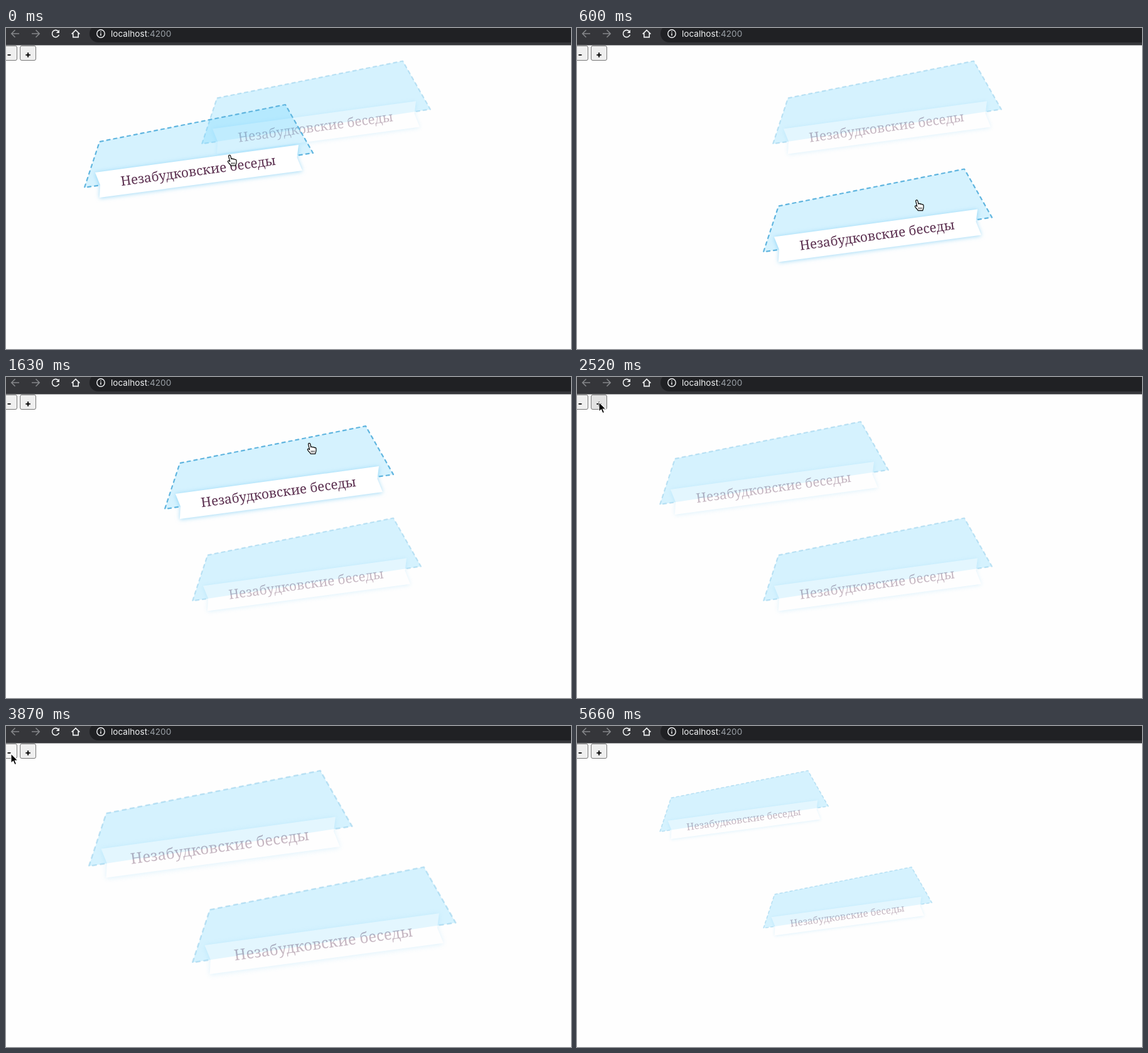
An HTML page for the animation above (6850 ms loop, 900x511 px).

```html
<!DOCTYPE html>
<html lang="ru">
<head>
<meta charset="utf-8">
<style>
  html, body { margin: 0; width: 100%; height: 100%; overflow: hidden; background: #fefefe; }
  svg { display: block; }
  .url { font: 13.6px Inter, Roboto, sans-serif; }
  .sign { font: bold 15px Inter, sans-serif; text-anchor: middle; }
  .label { font: 500 20.8px "Noto Serif", serif; text-anchor: middle; fill: #5c3050; }
  .ribbon { filter: drop-shadow(0 1.5px 3.5px rgba(80, 188, 240, .55)); }
  .icon { fill: none; stroke-width: 1.6; }
</style>
</head>
<body>
<svg width="900" height="511" viewBox="0 0 900 511">
  <defs>
    <path id="back" d="M6 0H-6M-.5 -5.7L-6.2 0L-.5 5.7"/>
  </defs>
  <rect width="900" height="511" fill="#fefefe"/>

  <g id="items"></g>

  <rect width="900" height="27.5" fill="#35363a"/>
  <rect x="133" y="-5" width="800" height="28" rx="14" fill="#202124"/>
  <g class="icon" stroke="#85878a">
    <use href="#back" x="15" y="9"/>
    <use href="#back" transform="translate(47 9) scale(-1 1)"/>
  </g>
  <g class="icon" stroke="#f1f3f4">
    <path d="M83.2 5.2A5.6 5.6 0 1 0 84.4 10.8"/>
    <path d="M85 2.8V8H79.8Z" fill="#f1f3f4" stroke="none"/>
    <path d="M104.6 9.6L111 3.4L117.4 9.6M106.8 8V14.6H115.2V8"/>
    <circle cx="151" cy="9" r="6.2" stroke-width="1.4"/>
    <path d="M151 8.2V12.3M151 5.4V7" stroke-width="1.5"/>
  </g>
  <text class="url" x="167" y="14" fill="#f1f3f4">localhost<tspan fill="#9aa0a6">:4200</tspan></text>

  <g stroke="#767676">
    <rect id="minus" x="-8.5" y="28.5" width="26" height="23" rx="2.5"/>
    <rect id="plus" x="22.5" y="28.5" width="25" height="23" rx="2.5"/>
  </g>
  <text class="sign" x="5" y="47">-</text>
  <text class="sign" x="35" y="47">+</text>

  <g id="hand" stroke="#000" stroke-width="1.2" stroke-linejoin="round">
    <path fill="#fff" d="M-5.4 -6.8c-.2 -2.3 2.8 -2.5 3.2 -.3l1.1 4.8c.8 -1.2 2.5 -1 2.8 .3c.9 -1 2.4 -.6 2.7 .6c1 -.7 2.6 0 2.6 1.4v3c0 2 -1 3 -1.3 5.2h-7.4c-.8 -2 -3.2 -3.5 -4.7 -6c-.8 -1.7 1 -2.5 2.3 -1.3l.8 .7z"/>
    <path d="M-.7 3v3M1.6 3v3M3.9 3v3" stroke-width=".9"/>
  </g>
  <path id="arrow" d="M0 -1V14.2L3.5 11L6 16.6L8.6 15.5L6.2 10H11Z" stroke="#fff" stroke-width="1.1"/>
</svg>
<script>
const LOOP = 6850, TICK = 148.9;
const $ = id => document.getElementById(id);

const span = (k, from, to) => Math.min(1, Math.max(0, (k - from) / (to - from)));
const easeOut = u => 1 - (1 - u) ** 3;
const mix = (a, b, u) => a.map((v, i) => v + (b[i] - v) * u);
const add = (a, b) => a.map((v, i) => v + b[i]);

// Point on a curve through any number of control points
function curve(points, u) {
  while (points.length > 1) points = points.slice(1).map((p, i) => mix(points[i], p, u));
  return points[0];
}

const lowerDrag = [[125, 122], [45, 230], [160, 300], [297, 224.5]];
const upperDrag = [[312, 52.5], [280, 78], [195, 99], [132, 71]];
const plusSpot = [35, 41], minusSpot = [8, 45], exitSpot = [850, 488];

const banner = `
  <path d="M24 59L320 0L364 77L0 132Z" fill="rgb(50,194,255)" fill-opacity=".2"/>
  <g class="fade">
    <path d="M21 128.8L0 132L24 59L320 0L364 77L340 80.6" fill="none" stroke="#60b5df"
      stroke-width="2.2" stroke-dasharray="5 6" stroke-linecap="round" stroke-linejoin="round"/>
    <path class="ribbon" d="M17 108L341 64L338.5 84L347 105L24 148L25 128Z" fill="#fff"/>
    <text class="label" transform="translate(182 112.5) rotate(-7.7)">Незабудковские беседы</text>
  </g>`;

function addBanner() {
  const g = document.createElementNS("http://www.w3.org/2000/svg", "g");
  g.innerHTML = banner;
  $("items").append(g);
  return g;
}
const upper = addBanner(), lower = addBanner();

function place(g, [x, y], zoom, active) {
  g.setAttribute("transform", `translate(${x} ${y}) scale(${zoom})`);
  g.querySelector(".fade").setAttribute("opacity", active ? 1 : .34);
}

// Each click on a button multiplies the zoom
function zoomAt(k) {
  const clicks = ticks => ticks.filter(c => c <= k).length;
  return 1.2 ** clicks([18, 20]) * .8 ** clicks([26, 27, 31]);
}

function pointerAt(k, upperPos, lowerPos) {
  const go = (p, target, from, to) => mix(p, target, easeOut(span(k, from, to)));
  const grip = mix([235, 89], [248, 58], span(k, 0, 4));
  let p = go(add(lowerPos, grip), add(upperPos, [234, 36]), 5, 7);
  p = go(p, plusSpot, 14, 17);
  p = go(p, minusSpot, 21, 24);
  return go(p, exitSpot, 34, 37);
}

// The picture advances in even steps, as a screen capture does
function draw(t) {
  const k = Math.floor((t + 13) / TICK), zoom = zoomAt(k);
  const lowerPos = curve(lowerDrag, span(k, 0, 4));
  const upperPos = curve(upperDrag, span(k, 9, 14));
  place(upper, upperPos, zoom, k >= 7 && k < 15);
  place(lower, lowerPos, zoom, k < 6);

  const isHand = k < 16, spot = pointerAt(k, upperPos, lowerPos);
  $("hand").style.display = isHand ? "" : "none";
  $("arrow").style.display = isHand || k > 37 ? "none" : "";
  $(isHand ? "hand" : "arrow").setAttribute("transform", `translate(${spot})`);

  $("plus").setAttribute("fill", k >= 17 && k < 22 ? "#e2e2e2" : "#efefef");
  $("minus").setAttribute("fill", k >= 24 && k < 35 ? "#f5f5f5" : "#efefef");
}

const start = performance.now();
function loop() {
  draw((performance.now() - start) % LOOP);
  requestAnimationFrame(loop);
}
loop();
</script>
</body>
</html>
```
